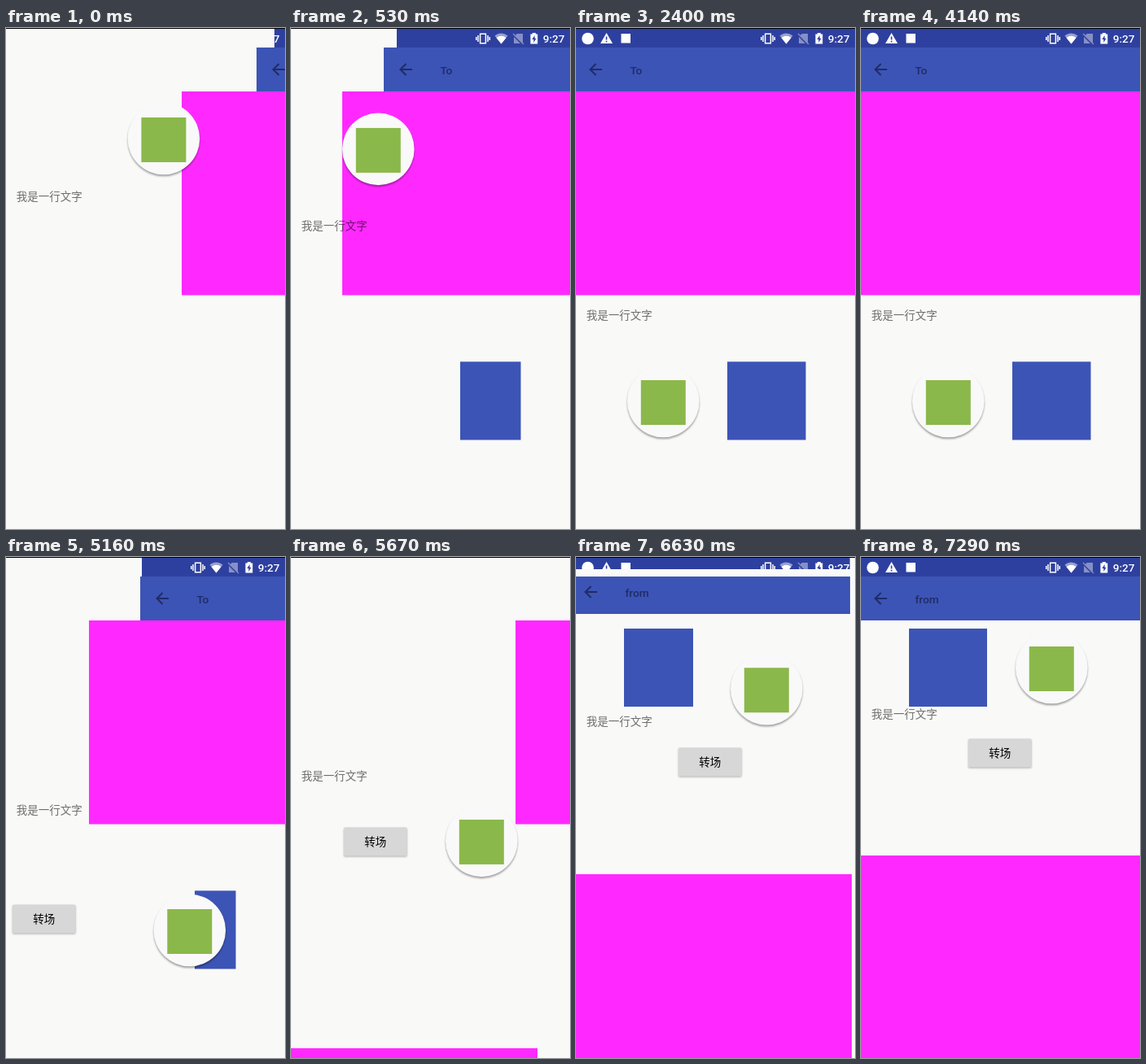
An HTML page for the animation above (7390 ms loop, 343 by 616 pixels).

```html
<!DOCTYPE html>
<html lang="zh">
<head>
<meta charset="utf-8">
<title>Shared element transition</title>
<style>
  html, body { margin: 0; width: 100%; height: 100%; overflow: hidden; background: #f9f9f8; }
  svg { display: block; width: 100vw; height: 100vh; }
  text { font-family: Roboto, "Noto Sans CJK SC", "Noto Sans CJK", sans-serif; font-size: 13.5px; }
  .blue { fill: #3c54b5; }
  .pink { fill: #ff29ff; }
  .ink { fill: #1f2c68; font-size: 13.7px; font-weight: 500; }
  .cjk { font-family: "Noto Sans CJK SC", "Noto Sans CJK", sans-serif; }
  #arrow { fill: none; stroke: #1f2c68; stroke-width: 2.1; }
  #disc { filter: drop-shadow(0 2px 1.2px rgba(0, 0, 0, .36)); }
  #buttonFace { filter: drop-shadow(0 1px 1px rgba(0, 0, 0, .3)); }
</style>
</head>
<body>
<svg viewBox="0 0 343 616">
  <defs>
    <clipPath id="content"><rect y="24" width="343" height="592"/></clipPath>
    <clipPath id="statusClip"><rect id="statusArea" y="1" width="343" height="23"/></clipPath>
    <path id="arrow" d="M32 51H17.5M24.5 44L17.5 51L24.5 58"/>
  </defs>
  <rect width="343" height="616" fill="#f9f9f8"/>

  <rect id="toPanel" class="pink" y="78" width="343" height="250.5"/>
  <rect id="toSquare" class="blue" y="410.3" height="96.2"/>
  <rect id="fromSquare" class="blue" x="59" y="88" height="96"/>
  <rect id="fromPanel" class="pink" y="367" width="343" height="249"/>

  <g clip-path="url(#content)">
    <g id="toBar">
      <rect id="toBarFill" class="blue" y="24" width="346" height="54"/>
      <use href="#arrow"/>
      <text class="ink" x="66.5" y="56.5">To</text>
    </g>
    <g id="fromBar">
      <rect class="blue" y="24" width="343" height="54"/>
      <use href="#arrow"/>
      <text class="ink" x="66.5" y="56.5">from</text>
    </g>
  </g>

  <g clip-path="url(#statusClip)" fill="#fff">
    <rect y="1" width="343" height="23" fill="#2e409f"/>
    <circle cx="14.5" cy="13" r="7.3"/>
    <path fill-rule="evenodd" d="M37.5 6L45 19H30ZM36.7 10.5V14.5H38.3V10.5ZM36.7 15.8V17.4H38.3V15.8Z"/>
    <rect x="55.5" y="7" width="11.5" height="11.5"/>
    <path fill="none" stroke="#fff" stroke-width="1.5" d="M232.6 7.2H239.4V18.8H232.6ZM230 9V17M242 9V17M227.8 11V15M244.2 11V15"/>
    <path opacity=".5" d="M250.5 9.5Q258.5 3.5 266.5 9.5L258.5 19.5Z"/>
    <path d="M252.5 12Q258.5 7.5 264.5 12L258.5 19.5Z"/>
    <g opacity=".42">
      <path d="M278 7H285V19L275 9.5ZM274 11L282 19H274Z"/>
      <path fill="none" stroke="#fff" stroke-width="1.2" d="M273 7L286 20"/>
    </g>
    <path fill-rule="evenodd" d="M296.8 6H300.8V7.4H303.2V19.6H294.4V7.4H296.8ZM299.6 9L296.3 14H298.3V18L301.5 12.8H299.6Z"/>
    <text x="309.8" y="17.8" font-weight="500">9:27</text>
  </g>

  <text id="label" class="cjk" x="12.7" y="5" fill="#000" fill-opacity=".56">我是一行文字</text>
  <g id="badge">
    <circle id="disc" r="44.3" fill="#f9f9f9"/>
    <rect x="-27.5" y="-26" width="55" height="55" fill="#8bb84b"/>
  </g>
  <g id="button">
    <rect id="buttonFace" x="132" y="223.5" width="77.5" height="35" rx="1.5" fill="#d6d7d6"/>
    <text class="cjk" x="170.8" y="246" text-anchor="middle" font-weight="500">转场</text>
  </g>
  <rect width="343" height="1" fill="#000"/>
</svg>
<script>
  const LOOP = 7390, WIDTH = 343, RETURN = 4140, SLIDE = 1450;
  // The picture holds between these moments.
  const ticks = [0, 120, 260, 380, 530, 680, 800, 960, 1080, 1200, 1350, 1500, 1620, 1770, 1890,
    2010, 2130, 2250, 2400, 4140, 4260, 4380, 4530, 4650, 4770, 4890, 5010, 5160, 5280, 5400, 5520,
    5670, 5790, 5910, 6060, 6210, 6360, 6510, 6630, 6780, 6900, 7020, 7170, 7290];

  const $ = id => document.getElementById(id);
  const set = (id, attrs) => {
    for (const key in attrs) $(id).setAttribute(key, attrs[key]);
  };
  const move = (id, x, y) => set(id, { transform: `translate(${x} ${y})` });
  const progress = (t, start, span) => Math.min(1, Math.max(0, (t - start) / span));
  const smooth = p => (1 - Math.cos(Math.PI * p)) / 2;
  // Share of a decelerating move that is left, 1 at `unit` ms before `end`.
  const left = (t, end, unit) => (Math.max(0, end - t) / unit) ** 2;

  function draw(t) {
    const back = t >= RETURN;
    // Hidden share of a view: decelerates in, accelerates out.
    const hidden = (enter, exit, span = SLIDE) =>
      back ? progress(t, exit, span) ** 2 : (1 - progress(t, enter, span)) ** 2;

    set('toPanel', { x: Math.round(WIDTH * hidden(-299, 4370)) });
    // The toolbar's fill reaches 3px past its content while it slides.
    const barX = Math.round((WIDTH + 3) * hidden(-76, 4150));
    move('toBar', barX, 0);
    set('toBarFill', { x: -Math.min(3, barX) });
    const cut = Math.round(96.5 * hidden(130, 4626, 770));
    set('toSquare', { x: 186 + cut, width: 96.5 - cut });

    const far = left(t, 7065, 855);
    move('fromPanel', Math.round(-15 * far), Math.round(89 * far));
    move('button', Math.round(-25 * far), Math.round(41 * far));
    const barLeft = left(t, 6980, 770);
    move('fromBar', Math.round(-27 * barLeft), Math.round(-37 * barLeft));
    set('fromSquare', { width: Math.round(96 * (1 - (1 - progress(t, 5883, 1117)) ** 2)) });

    if (t < 5600) {
      const x = Math.round(WIDTH * hidden(-28, 4149));
      set('statusArea', { x, width: WIDTH - x, height: 23 });
    } else {
      const lift = Math.round(24 * left(t, 7060, 700));
      set('statusArea', { x: 0, width: Math.max(0, WIDTH - .7 * lift), height: Math.max(0, 23 - lift) });
    }

    // The badge runs sideways first, then vertically, at one eased pace.
    const s = smooth(back ? progress(t, 4155, 2930) : progress(t, -562, 2900));
    const run = 450 * s, across = Math.min(run, 127), along = run - across;
    if (back) move('badge', 107.3 + across, 459 - along);
    else move('badge', 234.3 - across, 136 + along);
    move('label', 0, Math.round(back ? 353 - 160 * s : 193 + 160 * s));
  }

  const origin = performance.now();
  function frame() {
    const t = (performance.now() - origin) % LOOP;
    draw(ticks.findLast(tick => tick <= t) ?? 0);
    requestAnimationFrame(frame);
  }
  frame();
</script>
</body>
</html>
```
